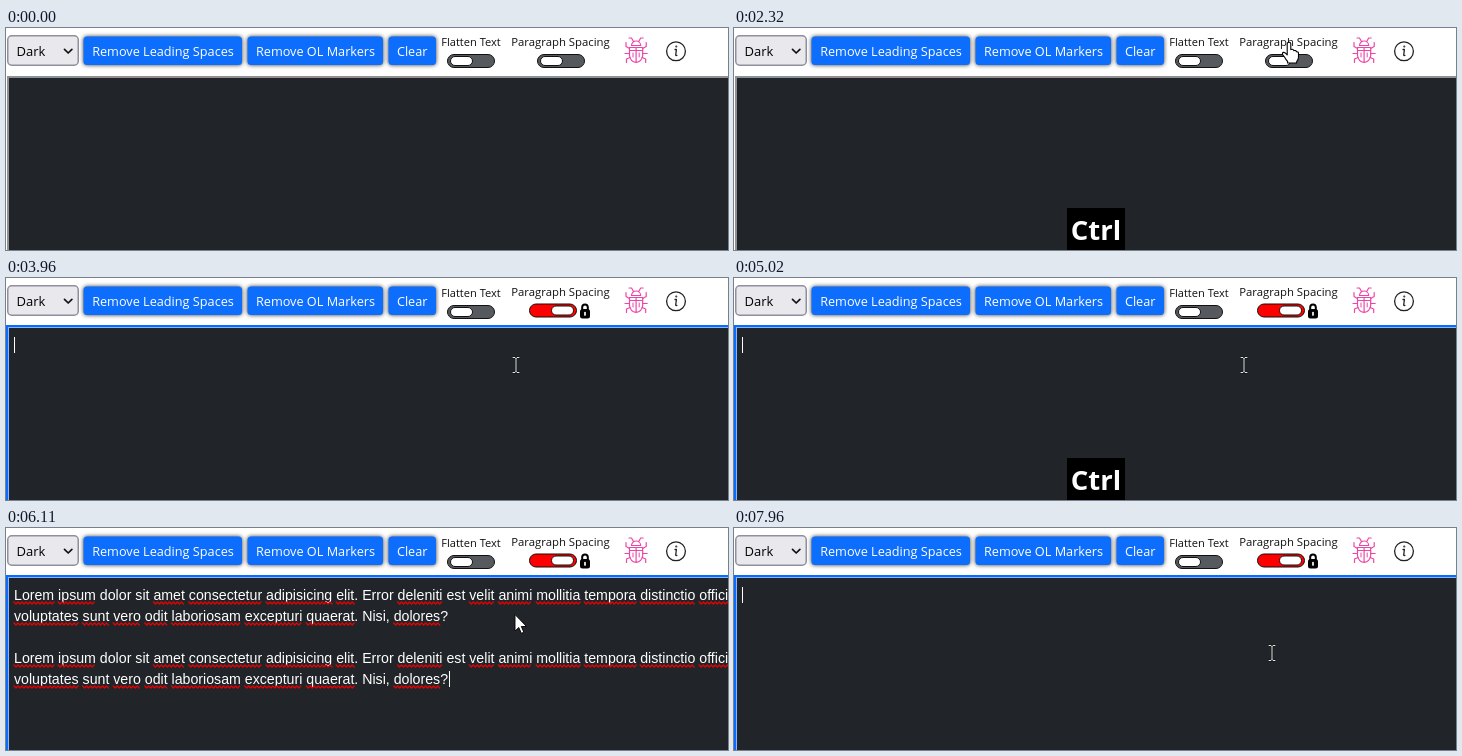
Write an HTML page that moves like this. It is 722 px wide and 222 px high and loops after 8000 ms.

```html
<!DOCTYPE html>
<html lang="en">
<head>
<meta charset="utf-8">
<title>Text box toolbar</title>
<style>
html, body { margin: 0; width: 100%; height: 100%; overflow: hidden; background: #fff; }
svg { display: block; width: 722px; height: 222px; }
text { white-space: pre; }
.ui { font-family: "Open Sans", "Noto Sans", sans-serif; font-size: 12.7px; text-anchor: middle; }
.btn text { fill: #fff; }
.btn rect { fill: #0d6efd; filter: drop-shadow(0 0 2px rgba(0,0,0,.8)); }
.label { font-size: 11.35px; fill: #111; }
.area { font-family: "Liberation Sans", Arial, sans-serif; font-size: 14.18px; fill: #fff; }
.keys { font-size: 27.5px; font-weight: 700; fill: #fff; }
.line { fill: none; stroke-linecap: round; stroke-linejoin: round; }
</style>
</head>
<body>
<svg viewBox="0 0 722 222" xmlns="http://www.w3.org/2000/svg">
  <rect width="722" height="222" fill="#fff"/>

  <rect x="1.75" y="7.75" width="70.5" height="29.5" rx="4" fill="#e9e9ed" stroke="#8f8f9d" stroke-width="1.5"/>
  <text class="ui" x="10.5" y="27.5" style="font-size:13px;text-anchor:start">Dark</text>
  <path class="line" d="M58.5 21.3l3.7 3.7l3.7-3.7" stroke="#111" stroke-width="1.7"/>

  <g class="ui btn">
    <rect x="77.5" y="8.5" width="158.5" height="28.5" rx="3.5"/><text x="157" y="27.5">Remove Leading Spaces</text>
    <rect x="241.5" y="8.5" width="135.5" height="28.5" rx="3.5"/><text x="309.5" y="27.5">Remove OL Markers</text>
    <rect id="clear" x="382.5" y="8.5" width="47.5" height="28.5" rx="3.5"/><text x="406.2" y="27.5">Clear</text>
  </g>

  <g id="flatten">
    <text class="ui label" x="465" y="18" style="font-size:11.1px">Flatten Text</text>
    <rect x="441.5" y="26.5" width="47" height="13" rx="6.5" fill="#565a5f" stroke="#111"/>
    <rect x="444.5" y="28.5" width="22" height="9" rx="4.5" fill="#fff" stroke="#111"/>
  </g>
  <text class="ui label" x="554.5" y="18">Paragraph Spacing</text>
  <g id="toggle">
    <rect id="track" x=".5" y=".5" width="47" height="13" rx="6.5" stroke="#111"/>
    <rect id="knob" y="2.5" width="22" height="9" rx="4.5" fill="#fff" stroke="#111"/>
  </g>
  <g id="lock">
    <path class="line" d="M576.2 32v-2.700a2.800 2.800 0 0 1 5.600 0V32" stroke="#000" stroke-width="2"/>
    <rect x="574" y="31" width="10" height="9.500" rx="2.500" fill="#000"/>
    <path class="line" d="M579 34.600v2.400" stroke="#fff" stroke-width="1.700"/>
  </g>

  <g class="line" stroke="#ee45a8" stroke-width="1.2">
    <path d="M625.5 17.500a4.600 4.500 0 0 1 9.200 0zM623.500 19.500h13.200v8q-.8 6-6.600 7q-5.800-1-6.600-7zM630.100 20v14M623.500 22.500h13.200"/>
    <path d="M627.500 13.500l-2-3.500h-2.500M632.700 13.500l2-3.500h2.500M623.500 20.500l-3.500-2v-4M636.700 20.500l3.500-2v-4M623.500 25.500h-4.500M636.700 25.500h4.500M624 29.500l-3.500 1.500v3.500M636.200 29.500l3.500 1.500v3.500"/>
    <path d="M627 25v4M633.200 25v4" stroke-width="1"/>
  </g>
  <g class="line" stroke="#222" stroke-width="1.300">
    <circle cx="670" cy="23.300" r="9.400"/>
    <path d="M669 21.500h1.400l-.7 5.500q0 .8 1.200 .4"/>
    <circle cx="670.300" cy="18.500" r=".4"/>
  </g>

  <rect id="border" x="2" y="49" width="740" height="200" fill="#212529" stroke-width="2"/>
  <rect id="ring" x="1" y="48" width="742" height="202" fill="none" stroke="#0a6cff" stroke-width="2"/>

  <g id="copy" class="area">
    <g id="para">
      <text x="8" y="72">Lorem ipsum dolor sit amet consectetur adipisicing elit. Error deleniti est velit animi mollitia tempora distinctio officia</text>
      <text x="8" y="93">voluptates sunt vero odit laboriosam excepturi quaerat. Nisi, dolores?</text>
      <path id="waves" class="line" stroke="#e80000" stroke-width="1.3"/>
    </g>
    <use id="second" href="#para"/>
  </g>
  <rect id="caret" width="1" height="16" fill="#fff"/>

  <g id="overlay">
    <rect id="keyBox" y="180" height="42"/>
    <text id="keyText" class="ui keys" x="362" y="212"></text>
  </g>

  <g id="cursor">
    <path id="hand" d="M-1.800 1.800Q-1.800 .3 0 .3T1.800 1.800V7.600Q4.300 6.700 4.800 8.600Q7 8 7.400 9.800Q9.500 9.400 9.500 11.500V15Q9.500 17.500 7.700 19.500V21H-1.400V19.500Q-2.900 18-4.200 15.500L-6.400 12.500Q-7 10.700-5.400 10.400Q-3.900 10.200-1.800 12.800Z" fill="#fff" stroke="#000" stroke-width="1.100" stroke-linejoin="round"/>
    <path id="arrow" d="M-1-.5V16L2.800 12.500L5.300 18.300L7.800 17.200L5.300 11.500H10.500Z" fill="#fff" stroke="#000" stroke-width=".9"/>
    <g id="beam" class="line">
      <path d="M-3-7.500H-1L0-6.500L1-7.500H3M0-6.500V6.500M-3 7.500H-1L0 6.500L1 7.500H3" stroke="#111" stroke-width="2.200"/>
      <path d="M-3-7.500H-1L0-6.500L1-7.500H3M0-6.500V6.500M-3 7.500H-1L0 6.500L1 7.500H3" stroke="#e8e8e8" stroke-width="1"/>
    </g>
  </g>
</svg>
<script>
const LOOP = 8000;
const $ = id => document.getElementById(id);
const set = (id, attrs) => { for (const k in attrs) $(id).setAttribute(k, attrs[k]); };
const show = (id, on) => set(id, { visibility: on ? "visible" : "hidden" });
const clamp = v => Math.min(1, Math.max(0, v));
const within = (t, a, b) => t >= a && t < b;
const ease = p => p * p * (3 - 2 * p);

// pointer stops: time, x, y
const stops = [
  [880, 688, 232], [950, 670, 202], [1050, 635, 142], [1150, 603, 90], [1450, 551, 34], [1700, 546, 26],
  [1870, 546, 26], [1960, 545, 20], [2070, 554, 14], [2220, 554, 14], [2320, 555, 14],
  [3220, 555, 14], [3400, 548, 32], [3700, 520, 78], [3960, 510, 87],
  [6740, 510, 87], [6940, 462, 50], [7140, 420, 20], [7240, 418, 20], [7570, 418, 20],
  [7700, 450, 56], [7850, 520, 112], [7960, 538, 125]
];
// caret flips on and off at these times, starting hidden
const blinks = [2780, 3400, 3910, 4470, 5020, 5530, 6110, 6620, 7140, 7340, 7500];
const known = ["dolor", "sit", "Error", "est", "Nisi"];

function pointer(t) {
  const i = stops.findIndex(s => s[0] > t);
  if (i < 0) return stops[stops.length - 1].slice(1);
  if (i === 0) return [700, 260];
  const [t0, x0, y0] = stops[i - 1], [t1, x1, y1] = stops[i];
  const p = (t - t0) / (t1 - t0);
  return [x0 + (x1 - x0) * p, y0 + (y1 - y0) * p];
}

function wave(x, width, y) {
  let d = `M${x} ${y + 2}`;
  for (let i = 1; i * 2 <= width; i++) d += `L${x + i * 2} ${y + (i % 2 ? 4 : 2)}`;
  return d;
}

function underline() {
  let d = "";
  for (const line of document.querySelectorAll("#para text")) {
    const y = +line.getAttribute("y");
    for (const m of line.textContent.matchAll(/\w+/g)) {
      if (known.includes(m[0])) continue;
      const x = line.getStartPositionOfChar(m.index).x;
      d += wave(x, line.getSubStringLength(m.index, m[0].length), y);
    }
  }
  set("waves", { d });
}

function drawToggle(t) {
  const on = t >= 2840;
  const mix = clamp((t - 2820) / 70);
  const rgb = [86 + 169 * mix, 90 - 90 * mix, 95 - 95 * mix].map(Math.round);
  set("flatten", { transform: `translate(0 ${on ? 1 : 0})` });
  set("toggle", { transform: `translate(${on ? "523 25.5" : "531 26"})` });
  set("track", { fill: `rgb(${rgb})` });
  set("knob", { x: 3.5 + 19 * ease(clamp((t - 2840) / 240)) });
  show("lock", on);
}

function drawKeys(t) {
  const paste = within(t, 5170, 5600);
  const ctrl = within(t, 2270, 3400) || within(t, 4820, 5170);
  show("overlay", paste || ctrl);
  set("keyBox", paste ? { x: 303, width: 118 } : { x: 333, width: 58 });
  $("keyText").textContent = paste ? "Ctrl + V" : "Ctrl";
}

function drawCopy(t) {
  const filled = within(t, 5170, 7500);
  const spaced = t >= 5880;
  const focused = t >= 2780 && !within(t, 7340, 7500);
  show("copy", filled);
  set("waves", { opacity: within(t, 5170, 5220) || within(t, 5880, 5930) ? 0 : 1 });
  set("second", { y: spaced ? 63 : 42 });
  show("caret", blinks.filter(b => b <= t).length % 2);
  set("caret", filled ? { x: 443, y: spaced ? 143 : 122 } : { x: 8, y: 59 });
  show("ring", focused);
  set("border", { stroke: focused ? "#86b7fe" : "#8f9193" });
}

function drawPointer(t) {
  const [x, y] = pointer(t);
  const onClear = x > 382 && x < 431 && y > 8 && y < 38;
  const onLabel = x > 505 && x < 604 && y < 41;
  const kind = onClear || onLabel ? "hand"
    : y < 48 || within(t, 5170, 6770) ? "arrow" : "beam";
  for (const id of ["hand", "arrow", "beam"]) show(id, id === kind);
  set("cursor", { transform: `translate(${x.toFixed(1)} ${y.toFixed(1)})` });
  $("clear").style.fill = onClear ? (within(t, 7340, 7500) ? "#0a58ca" : "#0b5ed7") : "#0d6efd";
}

function draw(t) {
  drawToggle(t);
  drawCopy(t);
  drawKeys(t);
  drawPointer(t);
}

const start = performance.now();
function tick() {
  draw((performance.now() - start) % LOOP);
  requestAnimationFrame(tick);
}
underline();
draw(0);
requestAnimationFrame(tick);
</script>
</body>
</html>
```
